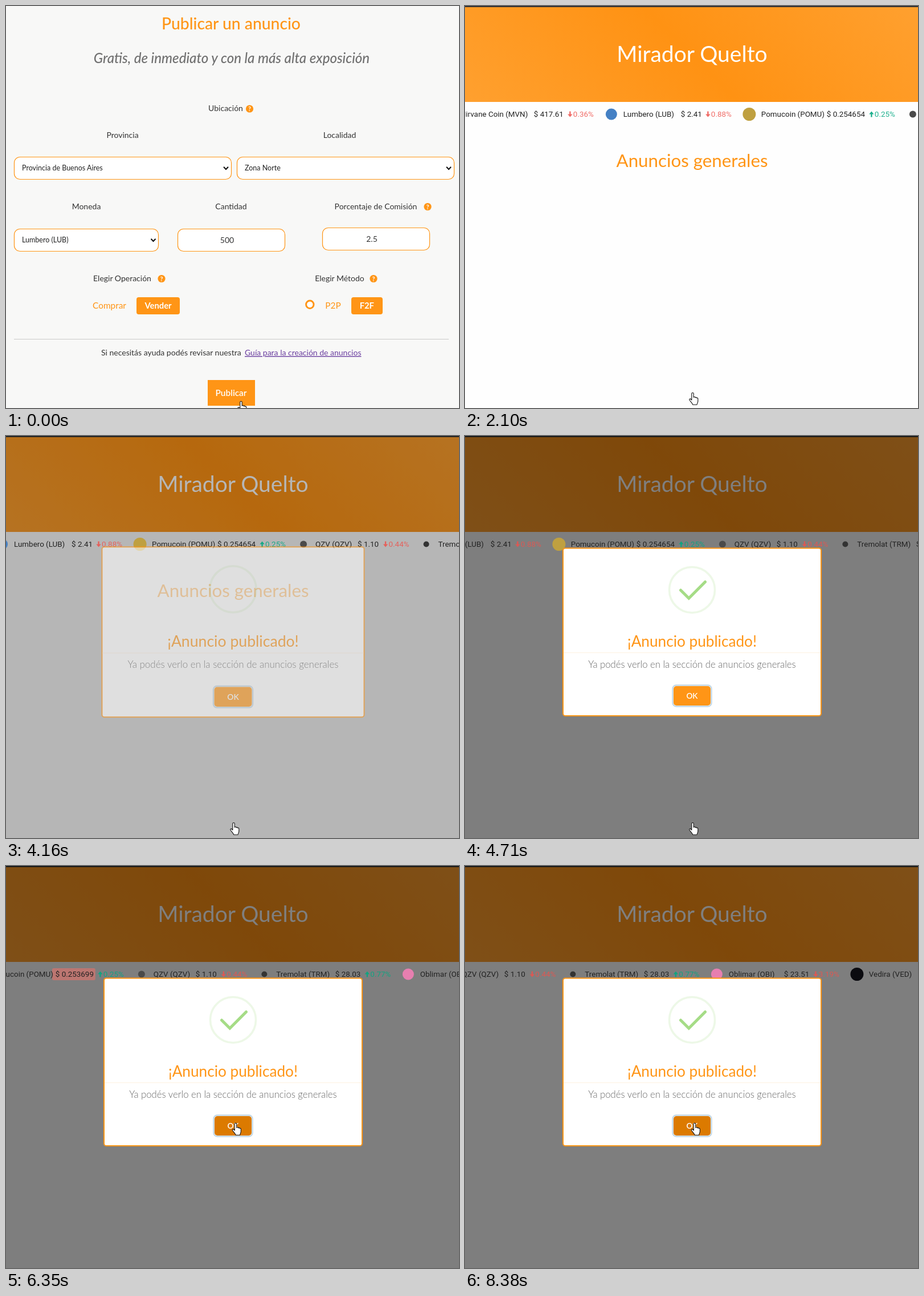
An HTML page for the animation above (8410 ms loop, 795 px wide and 704 px high).

```html
<!DOCTYPE html>
<html lang="es">
<head>
<meta charset="utf-8">
<title>Publicar un anuncio</title>
<style>
  html, body { margin: 0; width: 100%; height: 100%; overflow: hidden; background: #f8f8f7; }
  svg { display: block; }
  text { font-family: Lato, "Open Sans", sans-serif; font-size: 14px; fill: #333; white-space: pre; }
  .mid { text-anchor: middle; }
  .orange { fill: #ff9516; }
  .white { fill: #fff; }
  .semi { font-weight: 600; }
  .bold { font-weight: 700; }
  .option { font-size: 12.5px; fill: #222; }
  .choice { font-size: 15.4px; }
  .field { fill: #fff; stroke: #ff9516; stroke-width: 1.2; }
  .chevron { fill: none; stroke: #111; stroke-width: 2; }
  #ticker text { font-family: Roboto, sans-serif; font-size: 13.4px; fill: #222; }
  #ticker .up { fill: #06a882; opacity: .9; }
  #ticker .down { fill: #ee524c; opacity: .85; }
</style>
</head>
<body>
<svg width="795" height="704" viewBox="0 0 795 704">
  <defs>
    <linearGradient id="banner" gradientUnits="userSpaceOnUse" x1="157.5" y1="325" x2="637.5" y2="-155">
      <stop offset="0" stop-color="#ffa02f"/>
      <stop offset=".5" stop-color="#ff9213"/>
      <stop offset="1" stop-color="#ffa02f"/>
    </linearGradient>
    <g id="help">
      <circle r="6.6" class="orange"/>
      <text class="mid white bold" y="4" style="font-size:11px">?</text>
    </g>
    <path id="chevron" class="chevron" d="M-4-2.2 0 2 4-2.2"/>
  </defs>

  <g id="form">
    <rect width="795" height="704" fill="#f8f8f7"/>
    <text class="mid orange" x="395" y="41" style="font-size:28.3px;font-weight:500">Publicar un anuncio</text>
    <text class="mid" x="396" y="99.5" style="font-size:24.1px;font-style:italic;font-weight:500;fill:#707070">Gratis, de inmediato y con la más alta exposición</text>
    <g class="mid">
      <text x="385.5" y="184">Ubicación</text>
      <text x="204.5" y="231">Provincia</text>
      <text x="585.5" y="231">Localidad</text>
      <text x="141" y="356">Moneda</text>
      <text x="395" y="356">Cantidad</text>
      <text x="649" y="356">Porcentaje de Comisión</text>
      <text x="204" y="482">Elegir Operación</text>
      <text x="585.5" y="482">Elegir Método</text>
    </g>
    <use href="#help" x="427.5" y="180"/>
    <use href="#help" x="740" y="351.5"/>
    <use href="#help" x="273" y="477.5"/>
    <use href="#help" x="645" y="477.5"/>
    <g class="field">
      <rect x="14.5" y="264.5" width="381" height="39" rx="10"/>
      <rect x="405.5" y="264.5" width="381" height="39" rx="10"/>
      <rect x="14.5" y="390.5" width="253" height="39" rx="10"/>
      <rect x="301.5" y="390.5" width="188" height="39" rx="10"/>
      <rect x="555.5" y="388.5" width="188" height="39" rx="10"/>
    </g>
    <use href="#chevron" x="386" y="284"/>
    <use href="#chevron" x="777" y="284"/>
    <use href="#chevron" x="258.5" y="410"/>
    <text class="option" x="28" y="288">Provincia de Buenos Aires</text>
    <text class="option" x="419" y="288">Zona Norte</text>
    <text class="option" x="28" y="414">Lumbero (LUB)</text>
    <text class="mid" x="388" y="415">500</text>
    <text class="mid" x="642" y="413">2.5</text>
    <rect class="orange" x="229" y="510" width="76" height="30" rx="4"/>
    <rect class="orange" x="606" y="510" width="55" height="30" rx="4"/>
    <circle cx="533.3" cy="522.8" r="6.7" fill="#fff" stroke="#ff9516" stroke-width="3"/>
    <text class="mid choice orange" x="181.5" y="530">Comprar</text>
    <text class="mid choice white bold" x="267" y="530" style="font-size:14.8px">Vender</text>
    <text class="mid choice orange" x="574" y="530">P2P</text>
    <text class="mid choice white bold" x="633.3" y="530" style="font-size:14.8px">F2F</text>
    <path d="M14 583.5H777" stroke="#c9c9c8"/>
    <text x="167" y="612">Si necesitás ayuda podés revisar nuestra</text>
    <text x="419" y="612" style="fill:#6b3fa0;text-decoration:underline">Guía para la creación de anuncios</text>
    <rect class="orange" x="354" y="655" width="83" height="45"/>
    <text class="mid white semi" x="395" y="682.5" style="font-size:15.4px">Publicar</text>
  </g>

  <g id="market">
    <rect width="795" height="704" fill="#fefefe"/>
    <rect width="795" height="168" fill="url(#banner)"/>
    <rect width="795" height="2" fill="#333"/>
    <text class="mid white" x="398.5" y="98" style="font-size:39px">Mirador Quelto</text>
    <text id="heading" class="mid orange" x="398.5" y="282" style="font-size:31.3px">Anuncios generales</text>
    <rect id="shade" width="795" height="704"/>
    <g id="ticker"></g>
    <g id="modal">
      <rect x="172" y="196.5" width="453" height="293.5" rx="4" fill="#fff" stroke="#ff9516" stroke-width="2"/>
      <path d="M173 379.5H624" stroke="#fdf1e0"/>
      <circle cx="398.5" cy="269.5" r="40" fill="none" stroke="#edf8e7" stroke-width="3.6"/>
      <path id="check" d="M378.5 270 392.8 284.3 421.5 255.5" pathLength="1" stroke-dasharray="1 2" fill="none" stroke="#a5dc86" stroke-width="5" stroke-linecap="round"/>
      <text class="mid orange" x="398.5" y="369" style="font-size:26.2px">¡Anuncio publicado!</text>
      <text class="mid" x="398.5" y="405.5" style="font-size:16.7px;font-weight:300;fill:#666">Ya podés verlo en la sección de anuncios generales</text>
      <rect x="364.5" y="436.5" width="68" height="37" rx="6" fill="#fff" stroke="#c3d8e6" stroke-width="2.4"/>
      <rect id="ok" x="366" y="438" width="65" height="34" rx="5"/>
      <text class="mid white semi" x="398.5" y="460" style="font-size:13.6px">OK</text>
    </g>
  </g>

  <path id="cursor" fill="#fff" stroke="#111" stroke-width="1.1" stroke-linejoin="round"
    d="M4.8 13V2a1.7 1.7 0 0 1 3.4 0v6.3c.5-1.2 3-1 3 .6.5-1 2.6-.7 2.6.8.5-.9 2-.5 2 .9v4.4c0 2.2-1.4 3.8-1.8 6.2H6.8c-.8-2.2-3.6-5-5.8-8.2-.9-1.6 1.1-2.8 2.4-1.5z"/>
</svg>

<script>
const LOOP = 8410, PAGE_AT = 1230, TICKER_AT = 1530, MODAL_AT = 4130, POP_START = 3990, PRICE_AT = 6100;
const $ = id => document.getElementById(id);

// icon x, radius, colour, name, price x, price, percentage x, percentage (signed)
const coins = [
  [-31, 11, '#f3ba2f', 'Mirvane Coin (MVN)', 121, '417.61', 190, -0.36],
  [257, 10, '#4480c4', 'Lumbero (LUB)', 379, '2.41', 432, -0.88],
  [499, 11.5, '#bfa040', 'Pomucoin (POMU)', 635, '0.254654', 719, 0.25],
  [786, 6, '#4a4a4a', 'QZV (QZV)', 881, '1.10', 935.5, -0.44],
  [1001.5, 5, '#333', 'Tremolat (TRM)', 1126, '28.03', 1187.5, 0.77],
  [1254, 10, '#e77fb0', 'Oblimar (OBI)', 1372, '23.51', 1433, -3.19],
  [1500, 11.5, '#0b0b10', 'Vedira (VED)']
];

$('ticker').innerHTML =
  '<rect id="flash" x="629" y="179" width="76" height="21" rx="3" fill="#fa6e64" fill-opacity=".5"/>' +
  coins.map(([x, r, color, name, priceX, price, pctX, pct]) => {
    let item = `<circle cx="${x}" cy="189.5" r="${r}" fill="${color}"/><text x="${x + 21}" y="193.5">${name}</text>`;
    if (price) {
      const rising = pct > 0;
      item += `<text x="${priceX}" y="193.5">$ ${price}</text>
        <g class="${rising ? 'up' : 'down'}">
          <path transform="translate(${pctX - 5.5} 189.5) scale(1 ${rising ? 1 : -1})" d="M0-5 4.2 0H1.2V5H-1.2V0H-4.2z"/>
          <text x="${pctX}" y="193.5" style="fill:inherit">${Math.abs(pct).toFixed(2)}%</text>
        </g>`;
    }
    return item;
  }).join('');
const changingPrice = [...$('ticker').querySelectorAll('text')].find(el => el.textContent.includes('0.254654'));

const clamp = v => Math.min(1, Math.max(0, v));
const smooth = v => v * v * (3 - 2 * v);
const show = (el, visible) => { el.style.display = visible ? '' : 'none'; };

// Piecewise linear track; the first and last segments set the slope beyond the ends.
function track(points, t) {
  let i = 1;
  while (i < points.length - 1 && t > points[i][0]) i++;
  const [t0, v0] = points[i - 1], [t1, v1] = points[i];
  return v0 + (v1 - v0) * (t - t0) / (t1 - t0);
}

const scroll = [[2100, 0], [3370, 163], [4710, 334], [6350, 548], [7750, 733], [8380, 812]];
const pop = [[0, .7], [135, 1.05], [240, .95], [300, 1], [301, 1]];
const nudgeX = [[40, 13], [160, -9], [280, 0], [281, 0]];

function render(t) {
  show($('form'), t < PAGE_AT);
  show($('market'), t >= PAGE_AT);

  const tickerOn = t >= TICKER_AT;
  show($('ticker'), tickerOn);
  $('heading').setAttribute('y', tickerOn ? 282 : 241);
  $('ticker').setAttribute('transform', `translate(${-track(scroll, t)} 0)`);
  changingPrice.textContent = t < PRICE_AT ? '$ 0.254654' : '$ 0.253699';
  show($('flash'), t >= PRICE_AT && t < PRICE_AT + 1000);

  const open = t >= MODAL_AT, age = t - POP_START, fade = clamp(age / 300);
  show($('shade'), open);
  show($('modal'), open);
  $('shade').setAttribute('opacity', fade * .5);
  $('modal').setAttribute('opacity', fade);
  const size = track(pop, age);
  $('modal').setAttribute('transform', `translate(398.5 343) scale(${size}) translate(-398.5 -343)`);
  const drawn = clamp((age - 405) / 260);
  show($('check'), drawn > 0);
  $('check').setAttribute('stroke-dashoffset', 1 - drawn);

  const nudge = clamp((t - 40) / 240), climb = smooth(clamp((t - 5000) / 830));
  const x = 393 + track(nudgeX, Math.min(281, Math.max(40, t))) + 3.5 * climb;
  const y = 677 + 15 * (1 - smooth(nudge)) - 227 * climb;
  $('cursor').setAttribute('transform', `translate(${x} ${y})`);
  $('ok').setAttribute('fill', y < 472 ? '#dc7a00' : '#ff9516');
}

const start = performance.now();
function tick() {
  render((performance.now() - start) % LOOP);
  requestAnimationFrame(tick);
}
tick();
</script>
</body>
</html>
```
